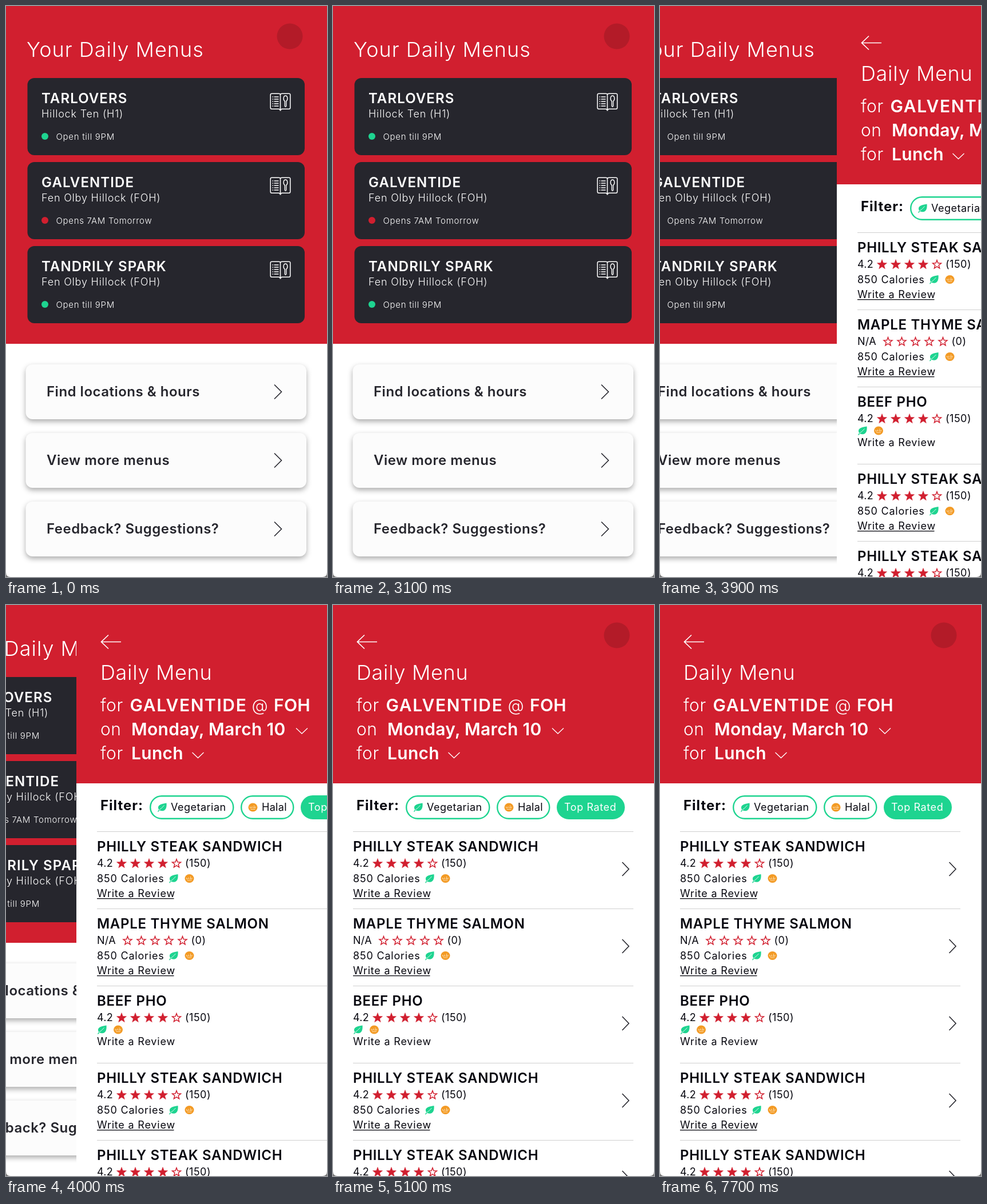
Write an HTML page that moves like this. It is 561 by 999 pixels and loops after 7.8 s.

```html
<!DOCTYPE html>
<html lang="en">
<head>
<meta charset="utf-8">
<title>Daily menus</title>
<style>
  html, body { margin: 0; width: 100%; height: 100%; overflow: hidden; background: #fff; }
  svg { display: block; width: 100vw; height: 100vh; }
  text { font-family: Inter, "Open Sans", sans-serif; font-optical-sizing: none; }
  .button { filter: drop-shadow(0 4px 5px rgba(0, 0, 0, .33)); }
</style>
</head>
<body>
<svg id="stage" viewBox="0 0 561 999"></svg>
<script>
const RED = '#d11f2f', DARK = '#26262d', GREEN = '#1ed490', ORANGE = '#f39a24', INK = '#07070f';
const LOOP = 7800, STEP = 100, PUSH_START = 3660, PUSH_TIME = 510, WIDTH = 561;

const text = (x, y, size, weight, fill, spacing, content) =>
  `<text x="${x}" y="${y}" font-size="${size}" font-weight="${weight}" fill="${fill}" letter-spacing="${spacing}">${content}</text>`;
const rect = (x, y, w, h, fill, r = 0, extra = '') =>
  `<rect x="${x}" y="${y}" width="${w}" height="${h}" rx="${r}" fill="${fill}" ${extra}/>`;
const circle = (x, y, r, fill) => `<circle cx="${x}" cy="${y}" r="${r}" fill="${fill}"/>`;
const line = (d, color, width) =>
  `<path d="${d}" fill="none" stroke="${color}" stroke-width="${width}"/>`;
const at = (x, y, content) => `<g transform="translate(${x} ${y})">${content}</g>`;
const repeat = (n, make) => Array.from({ length: n }, (_, i) => make(i)).join('');

const logo = circle(496, 53, 22.5, '#b31b28');

const book = line('M3 .8H15Q18 .8 18 3Q18 .8 21 .8H33Q35.3 .8 35.3 3V25.5Q35.3 27.7 33 27.7H21Q18 27.7 18 31Q18 27.7 15 27.7H3Q.7 27.7 .7 25.5V3Q.7 .8 3 .8ZM18 3V29', '#fff', 1.5)
  + repeat(5, i => line(`M4 ${6.5 + i * 4}h1.5M7 ${6.5 + i * 4}h8`, '#fff', 1.3))
  + line('M27 4.5C31 4.5 31.5 12 28.2 14V22.5Q27 25 25.8 22.5V14C22.5 12 23 4.5 27 4.5Z', '#fff', 1.4);

const leaf = `<path d="M-8 7.5L-6 4C-9.5 -3 -4 -6 7.5 -7.5C8.5 3 4.5 8.5 -4.5 5.3L-7 8Z" fill="${GREEN}"/>`
  + line('M-6 5Q-1 2 3.5 -3.5', '#fff', .8);
const halal = `<ellipse rx="8" ry="7.6" fill="${ORANGE}"/>`
  + line('M-5 -1.5V.8H-1.5V-2M0 .8H4.5V-1.5M2 -3.5V.8M-4 3.5H4', '#fde3b8', .9);

const starPath = 'M' + Array.from({ length: 10 }, (_, i) => {
  const r = i % 2 ? 3.8 : 9, a = i * Math.PI / 5;
  return `${(r * Math.sin(a)).toFixed(2)} ${(-r * Math.cos(a)).toFixed(2)}`;
}).join('L') + 'Z';
const stars = (x, y, filled) => repeat(5, i => at(x + i * 24, y,
  `<path d="${starPath}" transform="scale(${i < filled ? 1 : .87})" fill="${i < filled ? RED : '#fff'}" stroke="${RED}" stroke-width="${i < filled ? .5 : 1.7}"/>`));

function card(i, name, place, status, color) {
  return at(0, i * 147,
    rect(37.5, 126, 484.5, 135, DARK, 12)
    + text(62, 170, 24, 600, '#fff', 1.1, name)
    + text(62, 195, 18, 300, '#fff', .8, place)
    + circle(68, 228, 6, color)
    + text(87.5, 234, 15, 300, '#fff', .7, status)
    + at(461.5, 152.5, book));
}

function button(i, label) {
  return at(0, i * 120,
    rect(34.5, 627, 490.5, 96, '#fcfcfc', 12, 'class="button"')
    + text(71, 683, 24, 600, DARK, .5, label)
    + line('M469 662.5L481.5 675L469 687.5', DARK, 1.6));
}

// Pages start one pixel left of their own origin.
const page = headerHeight =>
  rect(-1, 0, WIDTH + 1, 999, '#fff') + rect(-1, 0, WIDTH + 1, headerHeight, RED) + logo;

const home = page(591)
  + text(36, 89, 36, 300, '#fff', 1, 'Your Daily Menus')
  + card(0, 'TARLOVERS', 'Hillock Ten (H1)', 'Open till 9PM', GREEN)
  + card(1, 'GALVENTIDE', 'Fen Olby Hillock (FOH)', 'Opens 7AM Tomorrow', RED)
  + card(2, 'TANDRILY SPARK', 'Fen Olby Hillock (FOH)', 'Open till 9PM', GREEN)
  + ['Find locations &amp; hours', 'View more menus', 'Feedback? Suggestions?']
    .map((label, i) => button(i, label)).join('');

function dish(i, name, rated = true, calories = true) {
  const note = (x, y, content) => text(x, y, 18, 400, INK, .8, content);
  const starX = rated ? 78 : 88.5;
  return at(0, i * 135,
    rect(35, 396, 490, 1, '#cfcfcf')
    + text(35, 431, 24, 600, INK, .7, name)
    + text(35, 458, 18, 400, INK, .3, rated ? '4.2' : 'N/A')
    + stars(starX, 452.5, rated ? 4 : 0)
    + text(starX + 111, 458, 18, 400, INK, .5, rated ? '(150)' : '(0)')
    + (calories ? note(35, 484.5, '850 Calories') : '')
    + at(calories ? 169 : 44, calories ? 478.5 : 473, leaf)
    + at(calories ? 196.5 : 72, calories ? 478.5 : 473, halal)
    + note(35, calories ? 511 : 500, 'Write a Review')
    + (calories ? rect(35, 513, 134.5, 1.3, INK) : '')
    + line('M505.5 450L517 462L505.5 474', DARK, 1.6));
}

const pill = (x, w, fill) =>
  rect(x + 1.2, 334.2, w - 2.4, 39.6, fill, 19.8, `stroke="${GREEN}" stroke-width="2.4"`);
const lead = (y, word) => text(41, y, 30, 300, '#fff', .5, word);
const strong = (x, y, content, spacing = .3) => text(x, y, 30, 600, '#fff', spacing, content);

const menu = page(312)
  + line('M77 64.5H42.5M55 52.5L42.5 64.5L55 76.5', '#fff', 1.7)
  + text(41, 131, 36, 300, '#fff', .7, 'Daily Menu')
  + lead(186, 'for') + strong(92.5, 186, 'GALVENTIDE', 1.6)
  + text(305.5, 186, 29, 300, '#fff', 0, '@') + strong(344, 186, 'FOH')
  + lead(228, 'on') + strong(95, 228, 'Monday, March 10')
  + line('M383 215.5L393 225L403 215.5', '#fff', 1.3)
  + lead(270, 'for') + strong(95, 270, 'Lunch')
  + line('M201.5 258L211.5 267.5L221.5 258', '#fff', 1.3)
  + text(41, 359, 24, 700, INK, 1, 'Filter:')
  + pill(127, 147.5, '#fff') + at(149, 354, leaf) + text(164, 360, 18, 400, INK, .5, 'Vegetarian')
  + pill(286, 93.5, '#fff') + at(307.5, 354, halal) + text(323, 360, 18, 400, INK, .3, 'Halal')
  + pill(391, 119, GREEN) + text(404, 360, 18, 400, '#fff', .6, 'Top Rated')
  + dish(0, 'PHILLY STEAK SANDWICH')
  + dish(1, 'MAPLE THYME SALMON', false)
  + dish(2, 'BEEF PHO', true, false)
  + dish(3, 'PHILLY STEAK SANDWICH')
  + dish(4, 'PHILLY STEAK SANDWICH');

const corners = '<path d="M0 991Q0 999 8 999H0ZM561 991Q561 999 553 999H561Z" fill="#777"/>';

document.getElementById('stage').innerHTML =
  `<g id="home">${home}</g><g id="menu">${menu}</g>${corners}`;
const homePage = document.getElementById('home'), menuPage = document.getElementById('menu');

// cubic-bezier(.45, 0, .55, 1)
function easeInOut(x) {
  if (x <= 0) return 0;
  if (x >= 1) return 1;
  let lo = 0, hi = 1, s = .5;
  for (let i = 0; i < 24; i++) {
    s = (lo + hi) / 2;
    const bx = 1.35 * s * (1 - s) ** 2 + 1.65 * s * s * (1 - s) + s ** 3;
    if (bx < x) lo = s; else hi = s;
  }
  return s * s * (3 - 2 * s);
}

const moveTo = (el, x) => el.setAttribute('transform', `translate(${Math.round(x)} 0)`);

function draw() {
  const t = Math.floor(performance.now() % LOOP / STEP) * STEP;
  const p = easeInOut((t - PUSH_START) / PUSH_TIME);
  moveTo(homePage, -.3 * WIDTH * p);
  // The extra pixel keeps the waiting page fully off stage.
  moveTo(menuPage, p ? WIDTH * (1 - p) : WIDTH + 1);
  requestAnimationFrame(draw);
}
draw();
</script>
</body>
</html>
```
